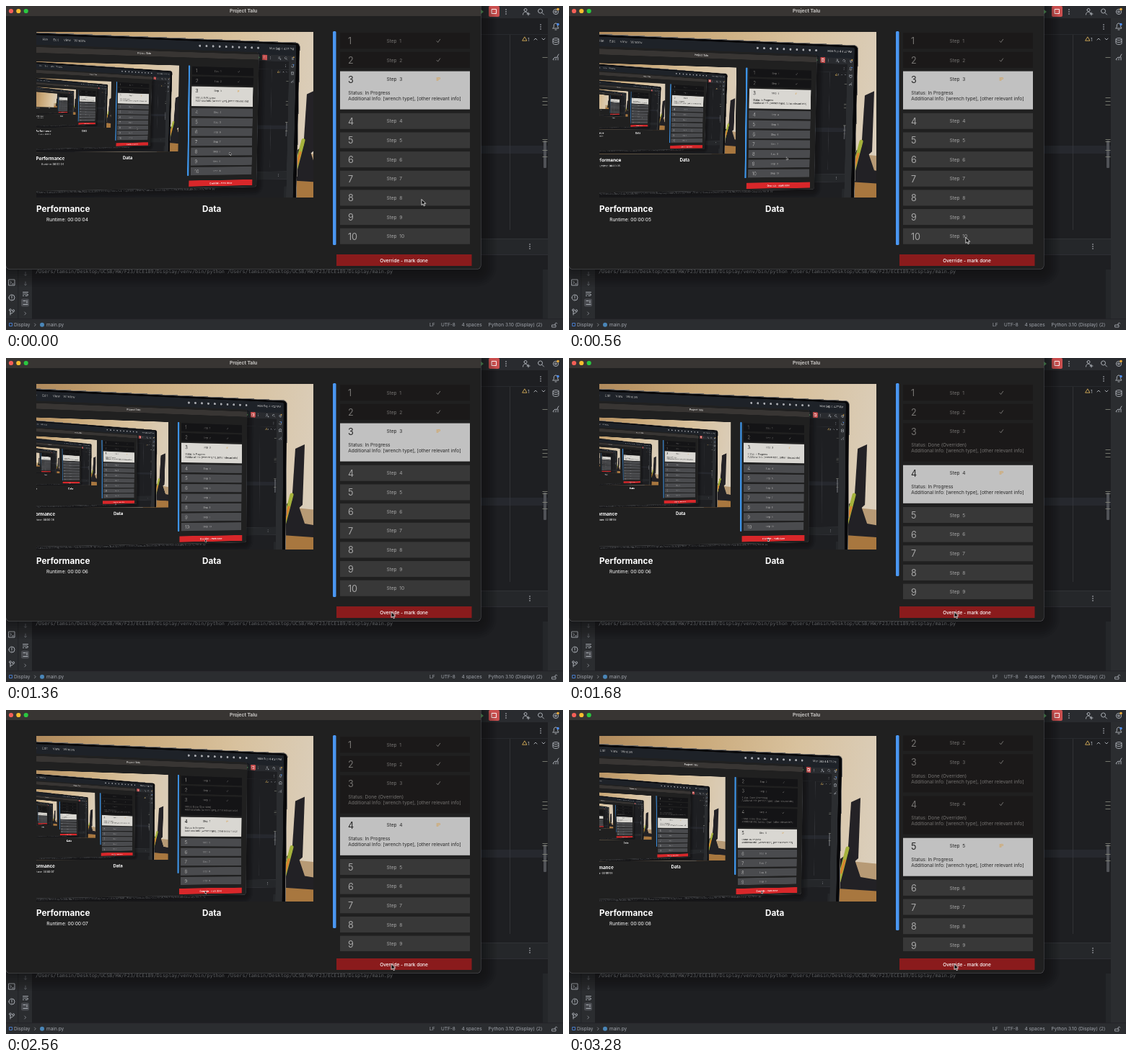
Write an HTML page that moves like this. It is 772 px wide and 450 px high and loops after 3.36 s.

```html
<!DOCTYPE html>
<html lang="en">
<head>
<meta charset="utf-8">
<title>Step tracker</title>
<style>
  html, body { margin: 0; width: 100%; height: 100%; overflow: hidden; background: #1e1f22; }
  .app { position: absolute; left: 0; top: 0; width: 772px; height: 450px; transform-origin: 0 0; }
  .app > svg { position: absolute; left: 0; top: 0; overflow: visible; }
  .photo {
    position: absolute; left: 42px; top: 36px; width: 384px; height: 230px; overflow: hidden;
    background: linear-gradient(100deg, #b08a5c, #c9a878 30%, #d8c19d 65%, #dbd0bf);
  }
  .photo > svg { position: absolute; left: 0; top: 0; }
  text { white-space: pre; }
</style>
</head>
<body>
<script>
const LOOP = 3360, STEP = 80, LAG = 200, DEPTH = 4;
const UI = "Inter, sans-serif";
const MONO = "'DejaVu Sans Mono', monospace";

const rect = (x, y, w, h, fill, rx = 0, more = "") =>
  `<rect x="${x}" y="${y}" width="${w}" height="${h}" fill="${fill}" rx="${rx}" ${more}/>`;
const dot = (x, y, r, fill) => `<circle cx="${x}" cy="${y}" r="${r}" fill="${fill}"/>`;
const line = (d, stroke = "#b4b8bf", width = 0.9) =>
  `<path d="${d}" fill="none" stroke="${stroke}" stroke-width="${width}" stroke-linecap="round" stroke-linejoin="round"/>`;
const fillPath = (d, fill) => `<path d="${d}" fill="${fill}"/>`;
const text = (x, y, s, size, fill, more = "", font = UI) =>
  `<text x="${x}" y="${y}" font-size="${size}" fill="${fill}" font-family="${font}" ${more}>${s}</text>`;
const dots = (x, y) => [-3, 0, 3].map(d => dot(x, y + d, 0.8, "#c4c7cc")).join("");
const ring = (x, y, r) => line(`M${x - r} ${y}a${r} ${r} 0 1 0 ${2 * r} 0a${r} ${r} 0 1 0 ${-2 * r} 0`);
const MIDDLE = 'text-anchor="middle"', BOLD = 'font-weight="700"';

// Editor window behind the app
const HOME = "/Users/tamsin/Desktop/UCSB/HW/F23/ECE189/Display";
const EDITOR = [
  rect(0, 0, 772, 450, "#1e1f22"),
  rect(650, 0, 122, 17, "#292b2f"),
  rect(751, 17, 21, 418, "#2b2d30"),
  rect(650, 194, 101, 11, "#26282e"),
  rect(698, 40, 0.7, 271, "#3a3c40"),
  rect(650, 39, 101, 0.6, "#303236"),
  rect(0, 323, 751, 22, "#25272a"),
  rect(0, 345, 751, 0.6, "#393b40"),
  rect(0, 323, 751, 0.6, "#393b40"),
  rect(0, 346, 36, 89, "#2b2d30"),
  rect(16.5, 346, 0.7, 89, "#1e1f22"),
  rect(744, 366, 7, 69, "#25272a"),
  rect(0, 434.5, 772, 15.5, "#2b2d30"),
  rect(0, 434.5, 772, 0.6, "#1e1f22"),
  rect(745, 187, 4, 38, "#505257", 1),
  [71, 127, 132, 137, 185, 188, 200, 209].map(y => rect(743.5, y, 7, 0.8, "#8a8c80")).join(""),
  fillPath("M657 4l5 4l-5 4z", "#57a35d"),
  rect(669, 0, 15, 15, "#c94f4f", 2),
  line("M673.5 4.5h6v6h-6z", "#fff"),
  dots(693, 8), dots(741, 29), dots(726, 334),
  ring(720, 5.5, 2), line("M716.5 12c0-5 6-5 7-1M724 9v4M722 11h4"),
  ring(740.5, 7, 3), line("M743 9.5l2.5 2.5"),
  ring(762, 8, 3.6), ring(762, 8, 1.3), dot(765, 4.5, 1.8, "#e6a93c"),
  line("M758 31h8l-1.3-2v-2c0-4-5.4-4-5.4 0v2zM761 33h2"), dot(765, 25.5, 1.7, "#4b8df0"),
  line("M758 46c0-2 8-2 8 0v6c0 2-8 2-8 0zM758 46c0 2 8 2 8 0M758 49c0 2 8 2 8 0"),
  line("M758 74l3-3l2 1l3-5M759 75v-1M762 75v-2M765 75v-4"),
  line("M719 43.2l3 5h-6z", "#d6ae58"), text(723, 48.8, "1", 6.5, "#b4b8bf"),
  line("M732 47l2-2l2 2M743 45l2 2l2-2"),
  line("M4 380h8v8h-8zM6 382.5l1.5 1.5l-1.5 1.5M8.5 386h2"),
  ring(8, 405, 4), line("M8 402.5v3M8 407.2v.2"),
  ring(6, 422.3, 1.4), ring(10.3, 423.2, 1.4), line("M6 424v5M6 427c3 0 4-1 4.3-2.3"),
  line("M27 369.5v5l-1.5-1.5M27 374.5l1.5-1.5M27 383v5l-1.5-1.5M27 388l1.5-1.5", "#65686e"),
  line("M23.5 397.5h7M23.5 400h6.5q1.5 2-1 2.5h-2M23.5 402.5h1"),
  rect(21, 406.5, 11, 11, "#484a4f", 2), line("M24 409.5h3M24 414.5h6M29 409v3.5"),
  line("M25.7 425l2 2l-2 2", "#85888e"),
  text(41, 371.2, `${HOME}/venv/bin/python ${HOME}/main.py`, 6.81, "#94969b", "", MONO),
  line("M5 440.5h3.5v4h-3.5z", "#4b84d8"),
  line("M39.5 441l1.8 1.8l-1.8 1.8", "#85888e"),
  dot(50, 442.8, 3, "#4a86b8"),
  text(11, 445.2, "Display", 6.5, "#a2a6ad"),
  text(56, 445.2, "main.py", 6.5, "#a2a6ad"),
  text(587, 445.2, "LF", 6.5, "#a2a6ad"),
  text(603, 445.2, "UTF-8", 6.5, "#a2a6ad"),
  text(631.5, 445.2, "4 spaces", 6.5, "#a2a6ad"),
  text(668.5, 445.2, "Python 3.10 (Display) (2)", 6.5, "#a2a6ad"),
  line("M757 443h5v3h-5zM761 443v-2q2-2 3 0", "#a2a6ad"),
].join("");

const SHADOW = Array.from({ length: 8 }, (_, i) => {
  const d = 1 + i * 3;
  return rect(-d, -6, 658 + 2 * d, 374 + d, "#00000010", 6 + d);
}).join("");

const WINDOW = [
  SHADOW,
  rect(-0.5, -6, 659, 372, "#55565a", 6),
  rect(0, -6, 658, 371.4, "#202020", 5.5),
  rect(0, 0, 658, 14, "#383533"),
  dot(7, 7, 3.1, "#f45f57"), dot(17.3, 7, 3.1, "#f8bd2f"), dot(27.7, 7, 3.1, "#2ac840"),
  text(329, 9.4, "Project Talu", 6.6, "#c9c7c5", `${BOLD} ${MIDDLE}`),
  text(42, 286.4, "Performance", 11.7, "#fff", BOLD),
  text(272, 286.4, "Data", 11.7, "#fff", BOLD),
].join("");

// Laptop body and system menu bar, in the coordinates of the screen
const LAPTOP = [
  rect(-300, -36, 1083, 560, "#08080a", 12, 'stroke="#77736e" stroke-width="2"'),
  rect(-60, -30, 832, 500, "#1e2228", 4),
  ["File", "Edit", "View", "Window"].map((s, i) => text(60 + i * 27, -17, s, 8, "#aaa")).join(""),
  Array.from({ length: 10 }, (_, i) => dot(485 + i * 19, -18, 3, "#a9abb0")).join(""),
  text(690, -15, "Mon Sep 4 4:27 PM", 8, "#ccc"),
].join("");

const SCREEN_COLORS = { button: "#8a1b1c", active: "#c1c1c1", bar: "#4a97f2", pending: "#383838", done: "#1b1919" };
const PHOTO_COLORS = { button: "#d8272a", active: "#d9d7d2", bar: "#3d93e6", pending: "#4a4b4e", done: "#141416" };

const activeStep = t => t < 1600 ? 3 : t < 3040 ? 4 : 5;

function stepList(t, c) {
  const active = activeStep(t);
  let y = active === 5 ? 8 : 37.3, out = "";
  for (let n = 1; n <= 10; n++) {
    const open = n >= 3 && n <= active, h = open ? 53 : 22;
    const ink = n < active ? "#757371" : n === active ? "#262626" : "#a6a6a6";
    out += rect(463, y, 180, h, n < active ? c.done : n === active ? c.active : c.pending);
    out += text(474, y + 16, n, 12.6, ink) + text(527.5, y + 13.6, "Step\u00a0 " + n, 6.55, ink);
    if (n < active) out += line(`M597 ${y + 11.4}l1.6 1.8l3-4.2`, "#8a8886", 0.8);
    if (n === active) out += text(596.3, y + 13.4, "IP", 6.55, "#d99b3f");
    if (open) {
      out += text(474.3, y + 32.2, n < active ? "Status: Done (Overriden)" : "Status: In Progress", 6.55, ink);
      out += text(474.3, y + 40.2, "Additional Info: [wrench type], [other relevant info]", 6.55, ink);
    }
    y += open ? 58.2 : 26.65;
  }
  const barEnd = { 3: 332, 4: 303, 5: 306 }[active];
  return `<svg x="450" y="35.5" width="200" height="299.5" viewBox="450 35.5 200 299.5">${out}</svg>` +
    rect(453, 35, 4.5, barEnd - 35, c.bar, 1.5);
}

// Piecewise linear track: keys are [time, ...values]
function track(keys, t, ease = k => k) {
  const i = keys.findIndex(k => k[0] > t);
  if (i < 0) return keys[keys.length - 1].slice(1);
  if (i === 0) return keys[0].slice(1);
  const a = keys[i - 1], b = keys[i], k = ease((t - a[0]) / (b[0] - a[0]));
  return a.slice(1).map((v, j) => v + (b[j + 1] - v) * k);
}

const POINTER = [[0, 576, 268.5], [240, 579, 263.5], [800, 531, 359], [960, 531, 359], [1280, 534, 352.5]];
const smooth = k => k * k * (3 - 2 * k);

function pointer(t) {
  const [x, y] = track(POINTER, t, smooth);
  return `<path transform="translate(${x} ${y})" d="M0 0v8l1.9-1.7l1.3 2.9l1.4-.6l-1.3-2.8h2.5z" fill="#000" stroke="#fff" stroke-width=".8"/>`;
}

function appMarkup(t, level) {
  const c = level ? PHOTO_COLORS : SCREEN_COLORS;
  const seconds = Math.max(4, 4 + Math.ceil((t - 79) / 1000));
  return (level ? LAPTOP : "") + EDITOR + WINDOW +
    text(85, 298.8, "Runtime: 00:00:0" + seconds, 6.6, "#fff", MIDDLE) +
    stepList(t, c) + rect(458, 345, 187.5, 16, c.button) +
    text(551.5, 355.7, "Override - mark done", 6.5, "#fff", `font-weight="500" ${MIDDLE}`) +
    pointer(t);
}

const ANCHORS = [42, 36, 643, 37, 645, 353, 42, 282];
const CAMERA = [
  [0, 41, 77, 343, 86, 341, 245, 41.5, 212],
  [240, 31, 76, 336.5, 86.5, 333.5, 245.5, 31.5, 211.5],
  [880, 32, 82, 335.5, 92.5, 334, 251.5, 33, 217],
  [1360, 26, 82, 327, 93, 327, 250, 28, 217],
  [2080, 25, 82, 325, 93.5, 325, 249.5, 25, 216.5],
  [2560, 26, 83, 327, 94, 326.5, 250.5, 28, 217],
  [3280, 19, 86, 317, 97, 316, 250, 22, 219],
];

const adjugate = ([a, b, c, d, e, f, g, h, i]) => [
  e * i - f * h, c * h - b * i, b * f - c * e,
  f * g - d * i, a * i - c * g, c * d - a * f,
  d * h - e * g, b * g - a * h, a * e - b * d];
const multiply = (m, n) => m.map((_, k) => {
  const r = k - k % 3, c = k % 3;
  return m[r] * n[c] + m[r + 1] * n[c + 3] + m[r + 2] * n[c + 6];
});
function basis([x1, y1, x2, y2, x3, y3, x4, y4]) {
  const m = [x1, x2, x3, y1, y2, y3, 1, 1, 1], inv = adjugate(m);
  const v = [0, 3, 6].map(r => inv[r] * x4 + inv[r + 1] * y4 + inv[r + 2]);
  return m.map((e, k) => e * v[k % 3]);
}
function perspective(from, to) {
  const h = multiply(basis(to), adjugate(basis(from)));
  const [a, b, c, d, e, f, g, k] = h.map(v => v / h[8]);
  return `matrix3d(${[a, d, 0, g, b, e, 0, k, 0, 0, 1, 0, c, f, 0, 1].map(v => v.toFixed(9))})`;
}

// Desk, stand and pen beside the laptop
const DESK = [
  fillPath("M340 205l140 14v80h-140z", "#b79a75"),
  fillPath("M340 246l140 8v60h-140z", "#a8773f"),
  fillPath("M391 128l13-6l-3 84l-16 14z", "#242226"),
  fillPath("M374 208l18-12l12 36l58 10v12l-90-6z", "#222125"),
  line("M386 192l-12 46", "#a5b23c", 5),
  line("M382 209l-5 17", "#d9812f", 3),
].join("");

const SVG_NS = "http://www.w3.org/2000/svg";
function addSvg(parent, w, h) {
  const svg = document.createElementNS(SVG_NS, "svg");
  svg.setAttribute("width", w);
  svg.setAttribute("height", h);
  return parent.appendChild(svg);
}
function addDiv(parent, name) {
  const div = document.createElement("div");
  div.className = name;
  return parent.appendChild(div);
}

function buildApp(parent, level) {
  const root = addDiv(parent, "app");
  const face = addSvg(root, 772, 450);
  const photo = addDiv(root, "photo");
  const desk = addSvg(photo, 384, 230);
  const inner = level < DEPTH ? buildApp(photo, level + 1) : null;
  return { root, face, desk, inner, level };
}

function renderApp(app, time) {
  const t = Math.max(0, time);
  app.face.innerHTML = appMarkup(t, app.level);
  const quad = track(CAMERA, t);
  app.desk.innerHTML = `<g transform="translate(${quad[2] - 317 - 42} ${(quad[3] - 97) / 2 - 36})">${DESK}</g>`;
  if (!app.inner) return;
  const local = quad.map((v, i) => v - (i % 2 ? 36 : 42));
  app.inner.root.style.transform = perspective(ANCHORS, local);
  renderApp(app.inner, time - LAG);
}

const main = buildApp(document.body, 0);
const start = performance.now();
let shown = -1;
function tick() {
  const t = Math.floor((performance.now() - start) % LOOP / STEP) * STEP;
  if (t !== shown) renderApp(main, shown = t);
  requestAnimationFrame(tick);
}
tick();
</script>
</body>
</html>
```
